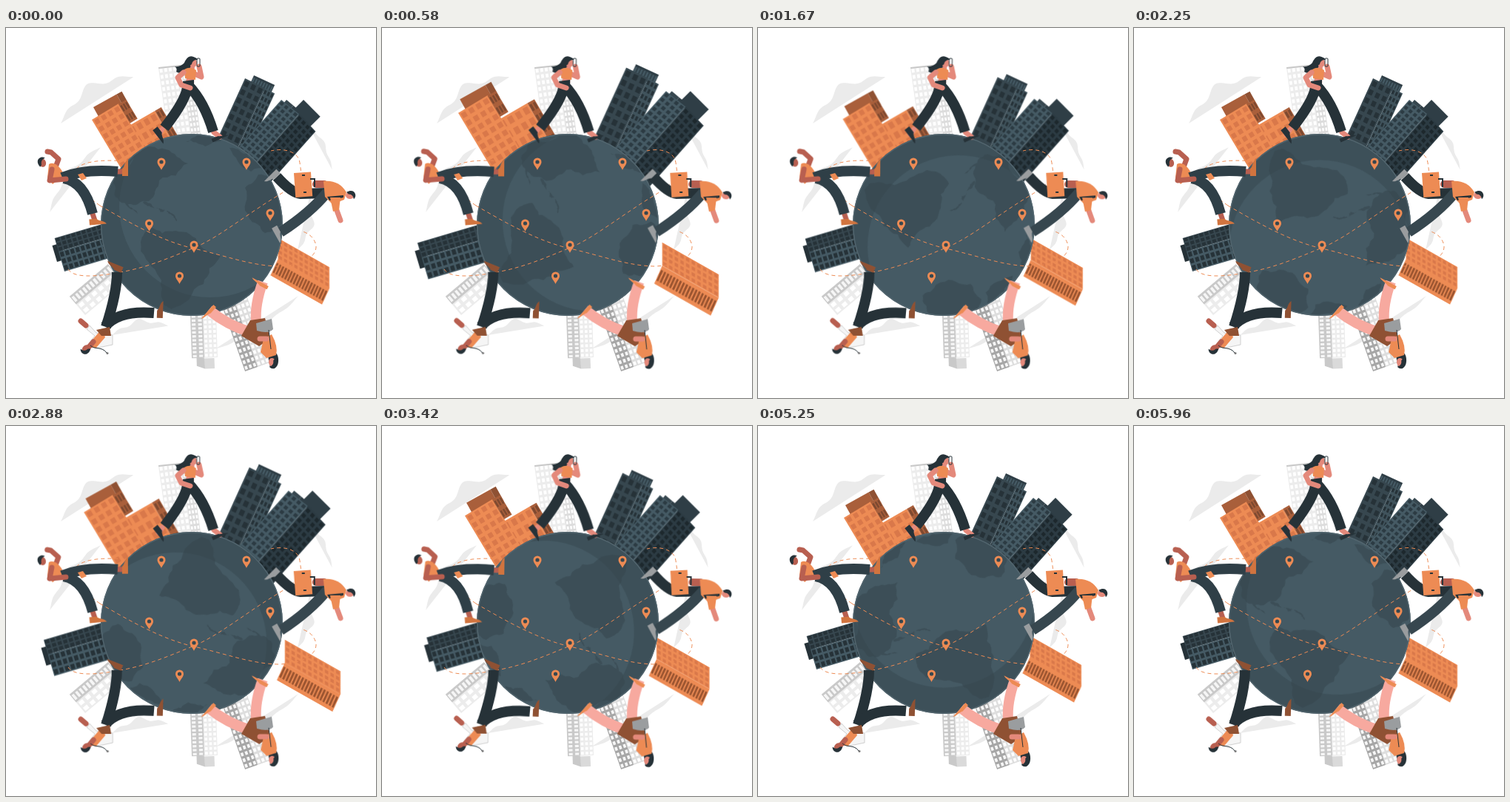
An HTML page that plays this animation: 500 px wide and 500 px high, repeating every 6000 ms.

```html
<!DOCTYPE html>
<html lang="en">
<head>
<meta charset="utf-8">
<title>Around the globe</title>
<style>
  html, body { margin: 0; width: 100%; height: 100%; overflow: hidden; background: #fff; }
  svg { display: block; width: 100%; height: 100%; }
  .beat { transform-origin: 250px 219px; animation: beat 6s linear infinite; }
  .spin { animation: spin 6s linear infinite; }
  .sway { transform-box: fill-box; transform-origin: center; animation: sway 1.5s linear infinite; }
  @keyframes beat {
    0%, 30%, 40%, 60%, 100% { transform: scale(1); }
    10%, 50% { transform: scale(1.1); }
  }
  @keyframes spin { to { transform: rotate(360deg); } }
  @keyframes sway {
    0%, 100% { transform: rotate(0deg); }
    25% { transform: rotate(1deg); }
    75% { transform: rotate(-1deg); }
  }
  .leg, .arm { fill: none; stroke-linejoin: round; }
  .leg { stroke: #263238; stroke-width: 14; }
  .arm { stroke-width: 7; stroke-linecap: round; }
  .line { fill: none; stroke: #263238; }
  .route { fill: none; stroke: #ed8b54; stroke-dasharray: 5 4; }
  .ink { fill: #263238; }
  .orange { fill: #ed8b54; }
  .brown { fill: #8f5133; }
  .grey { fill: #9a9d9f; }
  .rose { color: #e4897b; }
  .tan { color: #b85f50; }
  .rose .arm, .tan .arm { stroke: currentColor; }
</style>
</head>
<body>
<svg viewBox="0 0 500 500">
  <defs>
    <clipPath id="disc"><circle r="123"/></clipPath>
    <g id="pin">
      <path class="orange" d="M0 0C-1.5-4-5.5-7-5.5-11A5.5 5.5 0 0 1 5.5-11C5.5-7 1.5-4 0 0Z"/>
      <circle cy="-11" r="2.6" fill="#37474f"/>
    </g>
    <path id="shoe" d="M-6-8H4C7-4 14-5 17 0H-6Z"/>
    <g id="head">
      <ellipse rx="5" ry="6" fill="currentColor"/>
      <path class="ink" d="M-5 4C-9-8 3-10 6-4C2-4-1-3-2 2Z"/>
    </g>
  </defs>

  <g id="clouds" fill="#ebebeb"></g>
  <g id="pale"></g>
  <g id="city" class="beat"></g>

  <g transform="translate(251 266)">
    <g clip-path="url(#disc)">
      <g class="spin">
        <circle r="124" fill="#3d5059"/>
        <circle cx="25" cy="-25" r="123" fill="#455a64"/>
        <g id="lands" fill="#37474f" opacity=".6"></g>
      </g>
    </g>
    <circle r="122.3" fill="none" stroke="#53666f" stroke-width="1.4"/>
  </g>

  <g class="route">
    <path d="M127 240C165 262 210 288 254 298S330 321 368 322C400 321 420 310 419 294Q416 280 401 275"/>
    <path d="M84 326C92 339 125 336 160 329S222 310 254 297S325 252 365 228S399 198 397 182S374 162 358 166"/>
    <path d="M127 240C105 225 88 203 95 190Q110 176 160 180"/>
  </g>
  <g id="pins"></g>

  <!-- woman with a phone -->
  <g class="sway rose">
    <path class="ink" d="M257 41C248 34 243 42 241 47Q236 53 228 52Q232 54 230 59C238 64 250 60 252 52Z"/>
    <path class="arm" d="M255 62L264 66L261 52"/>
    <use href="#head" x="253" y="47"/>
    <rect x="258" y="41" width="4" height="11" rx="1" fill="#fff" class="line"/>
    <path fill="currentColor" d="M250 50H255L254 78H241Z"/>
    <path class="orange" d="M241 56Q249 51 257 57L256 70L242 68Z"/>
    <path class="arm" d="M211 137L206 144M281 141L289 147"/>
    <path class="leg" d="M245 80Q243 98 214 135"/>
    <path class="leg" d="M247 78Q268 100 280 140"/>
    <path class="ink" d="M239 72L254 70V86L239 92Z"/>
    <path class="arm" d="M240 60L232 67L237 77L249 81"/>
    <use href="#shoe" class="ink" transform="translate(202 143)rotate(52)"/>
    <use href="#shoe" class="ink" transform="translate(285 152)rotate(-24)scale(1 .6)"/>
  </g>

  <!-- man with a raised fist -->
  <g class="sway tan">
    <path class="arm" d="M67 188L71 177L61 168L56 167"/>
    <path class="orange" d="M58 184C66 179 76 191 78 199L63 211L56 202Z"/>
    <use href="#head" transform="translate(49 182)rotate(-25)"/>
    <path class="arm" d="M148 194H160M116 248L120 260"/>
    <g style="stroke: #2f3f47">
      <path class="leg" style="stroke: inherit" d="M76 202Q105 190 151 194"/>
      <path class="leg" style="stroke: inherit" d="M78 203Q106 208 117 251"/>
    </g>
    <path class="orange" d="M97 198L104 196L109 203L102 206Z"/>
    <path class="arm" d="M62 191L59 206L81 204"/>
    <g fill="#d1743f">
      <use href="#shoe" transform="translate(165 194)rotate(-90)"/>
      <use href="#shoe" transform="translate(119 266)rotate(-5)"/>
    </g>
  </g>

  <!-- man with a briefcase -->
  <g class="sway rose">
    <path class="leg" d="M366 201Q386 223 398 224L434 223"/>
    <path class="leg" style="stroke: #37474f" d="M434 222Q411 250 371 276"/>
    <g class="grey">
      <use href="#shoe" transform="translate(361 195)rotate(135)"/>
      <use href="#shoe" transform="translate(362 276)rotate(61)"/>
    </g>
    <path class="arm tan" style="stroke-width: 10" d="M419 211H430"/>
    <rect class="orange" width="23" height="33" transform="translate(389 196)rotate(-4)"/>
    <path class="line" stroke-width="2" d="M411 204H417V215M400 199H404M402 222H406"/>
    <path class="orange" d="M429 207Q450 205 460 222L457 232L441 238L431 228Z"/>
    <path class="ink" d="M434 228L456 226V229L437 233Z"/>
    <path class="arm" d="M445 241L452 260"/>
    <path class="orange" d="M438 229H452L450 246L442 248Z"/>
    <use href="#head" transform="translate(465 226)rotate(80)"/>
  </g>

  <!-- reporter -->
  <g class="sway tan">
    <path class="leg" d="M150 330Q150 358 135 404"/>
    <path class="leg" d="M134 403Q153 381 200 385"/>
    <g class="brown">
      <use href="#shoe" transform="translate(153 321)rotate(202)"/>
      <use href="#shoe" transform="translate(212 386)rotate(-88)"/>
    </g>
    <path d="M113 402L122 412L144 415V428L120 433L112 426L120 416L109 407Z" fill="#f5f5f5" stroke="#c5c5c5" stroke-width=".8"/>
    <path class="orange" d="M118 420L130 406L134 418L122 432H112Z"/>
    <path class="brown" d="M122 408L140 404L142 416H129Z"/>
    <path class="arm" d="M101 396L108 402M118 424L112 431"/>
    <use href="#head" transform="translate(108 434)rotate(215)"/>
    <path class="line" d="M114 429C120 435 130 430 136 439"/>
    <circle cx="137" cy="439.5" r="1.5" fill="#777"/>
  </g>

  <!-- woman with a bag -->
  <g class="sway rose">
    <path class="leg" style="stroke: #f7a99f" d="M347 343Q336 374 338 397"/>
    <path class="leg" style="stroke: #f7a99f" d="M274 381Q300 402 330 411"/>
    <g class="orange">
      <use href="#shoe" transform="translate(349 346)rotate(208)scale(1.1 .6)"/>
      <use href="#shoe" transform="translate(276 379)rotate(132)scale(1.1 .6)"/>
    </g>
    <path class="brown" d="M318 416L330 395L350 392L357 420L342 430Z"/>
    <path class="ink" d="M354 442C358 435 367 436 368 447S362 463 357 459Z"/>
    <path class="orange" d="M348 420L359 414Q368 430 365 442L352 446L344 438Z"/>
    <path class="grey" d="M338 399L359 393L361 407Q355 414 339 409Z"/>
    <path class="line" d="M355 408L358 434"/>
    <path class="arm" d="M343 420H352"/>
    <use href="#head" transform="translate(360 452)rotate(160)"/>
  </g>
</svg>
<script>
  const byId = id => document.getElementById(id);
  const ink = '#263238', slate = '#37474f', steel = '#455a64', dusk = '#2f3e46';
  const orange = '#ed8b54', rust = '#d9784a', brown = '#a95f3b', umber = '#7d4930';

  // one wall: w wide, h deep, with an even grid of panes
  function wall({ w, lean = 0, fill, glass, cols = 0, rows = 0, gap = .4 }, h) {
    const cw = w / cols, ch = h / rows;
    let d = '';
    for (let i = 0; i < cols * rows; i++) {
      const x = (i % cols + gap / 2) * cw, y = (Math.floor(i / cols) + gap / 2) * ch;
      d += `M${x} ${y}h${cw * (1 - gap)}v${ch * (1 - gap)}h${-cw * (1 - gap)}z`;
    }
    return `<g transform="skewY(${lean})"><path d="M0 0h${w}v${h}h${-w}z" fill="${fill}"/><path d="${d}" fill="${glass}"/></g>`;
  }

  // walls side by side from the top corner; the building points at the globe
  function tower(x, y, turn, h, ...walls) {
    let left = 0, drop = 0, out = '';
    for (const side of walls) {
      out += `<g transform="translate(${left} ${drop})">${wall(side, h)}</g>`;
      left += side.w;
      drop += side.w * Math.tan((side.lean || 0) * Math.PI / 180);
    }
    return `<g transform="translate(${x} ${y})rotate(${turn})">${out}</g>`;
  }

  const light = { fill: '#ececec', glass: '#fff' };
  const shade = { fill: '#c9c9c9', glass: '#f6f6f6' };
  byId('pale').innerHTML = [
    tower(206, 54, -8, 100, { ...light, w: 31, cols: 5, rows: 12 }, { ...light, fill: '#dcdcdc', w: 13, cols: 3, rows: 14 }),
    tower(206, 53, -6, 2, { ...shade, w: 31 }),
    tower(282, 460, 178, 14, { ...light, fill: '#dadada', w: 13 }, { ...shade, w: 11, lean: 20 }),
    tower(286, 445, 178, 64, { ...light, w: 18, cols: 3, rows: 10 }, { ...shade, w: 17, cols: 2, rows: 12 }),
    tower(357, 452, 160.6, 105, { ...light, fill: '#dedede', w: 18, cols: 3, rows: 13 },
      { ...shade, fill: '#a6a6a6', w: 18, cols: 3, rows: 13 }),
    tower(107, 388, -130, 68, { ...light, w: 19, cols: 2, rows: 6 }, { ...shade, w: 14, cols: 1, rows: 11 })
  ].join('');

  const clay = { fill: orange, glass: rust };
  const dim = { fill: brown, glass: umber };
  const blue = { fill: steel, glass: ink };
  const night = { fill: slate, glass: ink };
  byId('city').innerHTML = [
    tower(118, 107, -29, 22, { ...dim, w: 36 }, { ...dim, fill: '#8f5133', w: 8 }),
    tower(163, 134, -30, 75, { ...clay, w: 44, cols: 4, rows: 5 }, { ...dim, w: 10, cols: 2, rows: 5 }),
    tower(116, 124, -31, 90, { ...clay, w: 42, cols: 4, rows: 8 }),
    tower(152, 103, -31, 30, { ...dim, w: 12, cols: 3, rows: 2 }),

    tower(335, 64, 25, 14, { ...blue, fill: dusk, glass: steel, w: 31, cols: 8, rows: 1 }),
    tower(323, 68, 24.5, 110, { ...night, w: 30, lean: 2, cols: 3, rows: 9 }, { ...night, fill: '#40535c', w: 15, lean: 4, cols: 3, rows: 12 }),

    tower(379, 97, 40, 18, { ...night, w: 12 }, { ...night, fill: dusk, w: 10 }),
    tower(402, 97, 45, 20, { ...night, fill: dusk, w: 32 }),
    tower(372, 97, 41.6, 105, { ...blue, glass: '#2c3b43', w: 31, lean: -3, cols: 4, rows: 14 },
      { ...night, fill: '#2c3b43', glass: '#1d282d', w: 32, lean: 5, cols: 4, rows: 13 }),

    tower(69, 316, -106.5, 12, { ...night, fill: ink, w: 23 }),
    tower(79, 329, -106.5, 80, { ...blue, w: 28, cols: 3, rows: 11, gap: .32 }, { ...night, w: 19, cols: 3, rows: 11, gap: .3 }),

    tower(437, 323, 119.5, 80, { ...clay, w: 25, lean: -29.5, cols: 4, rows: 10 },
      { ...clay, glass: '#99532f', w: 24, lean: -5, cols: 1, rows: 18 })
  ].join('');

  // wisp between two tips, swollen in the middle and rippled on one side
  function cloud(x, y, x2, y2, puff) {
    let d = `M${x} ${y}`;
    const dx = x2 - x, dy = y2 - y, len = Math.hypot(dx, dy);
    for (let t = 0; t <= 1; t += .02) {
      const rise = puff * Math.sin(Math.PI * t) * (1 + .25 * Math.sin(t * 16));
      d += `L${x + dx * t + dy / len * rise} ${y + dy * t - dx / len * rise}`;
    }
    return `<path d="${d}Z"/>`;
  }
  byId('clouds').innerHTML =
    cloud(74, 129, 175, 66, 21) + cloud(59, 249, 130, 160, 14) + cloud(405, 125, 441, 193, 7) +
    cloud(394, 300, 410, 225, -12) + cloud(282, 434, 397, 360, -10) + cloud(143, 415, 221, 403, 13);

  let seed = 7;
  const rand = () => (seed = seed * 16807 % 2147483647) / 2147483647;

  // coast through a few points, roughened by moving the midpoints
  function land(corners) {
    let pts = corners.split(' ').map(p => p.split(',').map(Number));
    for (let pass = 0; pass < 3; pass++)
      pts = pts.flatMap(([x, y], i) => {
        const [nx, ny] = pts[(i + 1) % pts.length], k = (rand() - .5) * .35;
        return [[x, y], [(x + nx) / 2 + (ny - y) * k, (y + ny) / 2 - (nx - x) * k]];
      });
    return `<path d="M${pts.join('L')}Z"/>`;
  }
  byId('lands').innerHTML = [
    '-56,3 -22,8 11,27 39,42 16,80 -28,114 -38,107 -47,66 -69,23',
    '-106,-60 -75,-98 -35,-102 -5,-83 -44,-60 -58,-32 -86,-28 -73,-15 -98,-32',
    '-8,-112 12,-123 41,-115 18,-106',
    '72,-50 90,-68 124,-60 124,-5 99,11 77,-10',
    '51,-104 80,-90 118,-66 80,-72',
    '-66,-31 -50,-22 -60,-25',
    '-48,-23 -36,-20 -42,-17',
    '-34,-19 -24,-14 -20,-5 -25,-12'
  ].map(land).join('');

  const spots = [[210, 192], [325, 192], [193.5, 275], [357, 261], [254, 304], [234.5, 346]];
  byId('pins').innerHTML = spots.map(([x, y]) => `<use href="#pin" x="${x}" y="${y}"/>`).join('');
</script>
</body>
</html>
```
